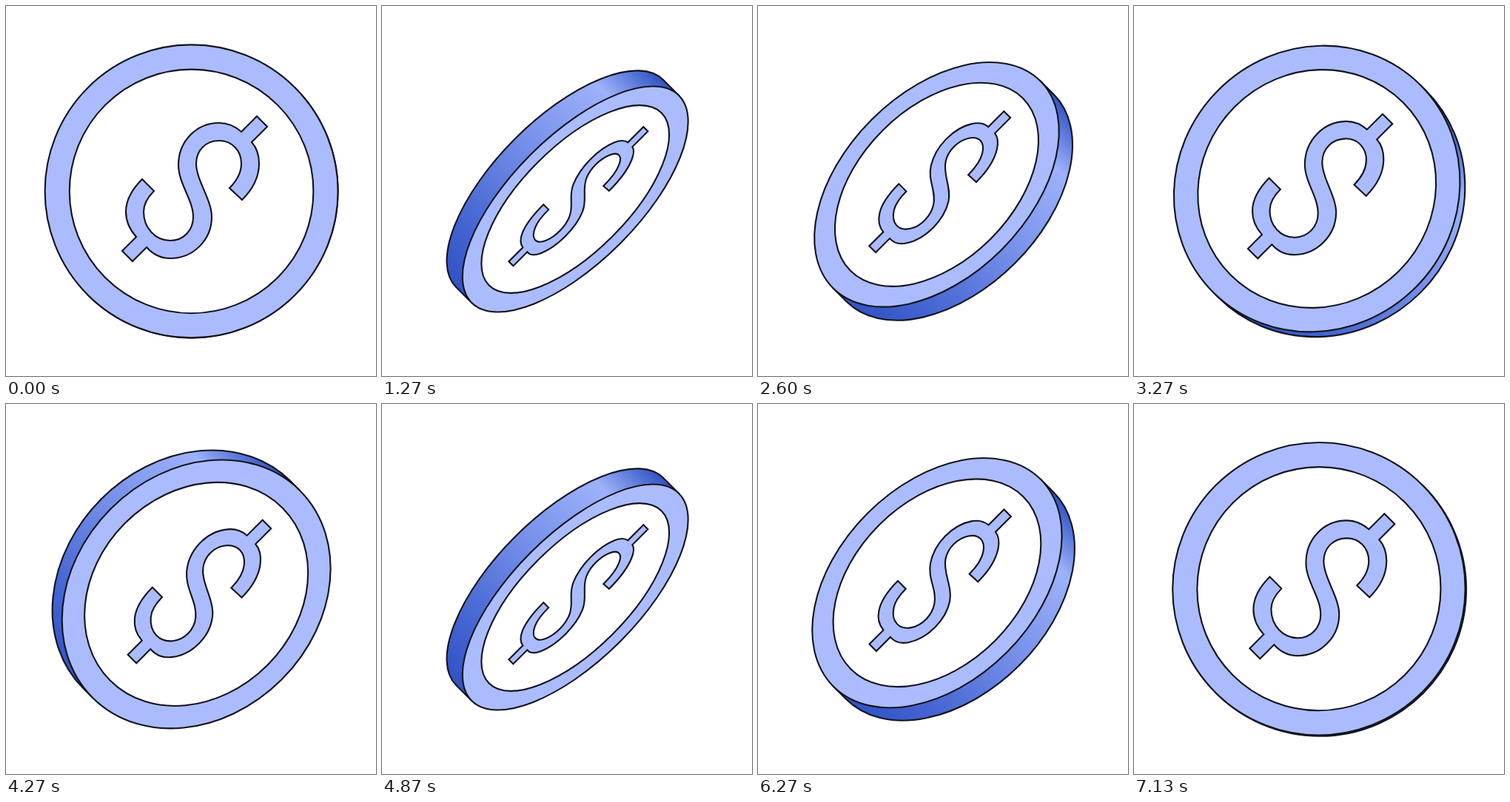
An HTML page for the animation above (7190 ms loop, 500 by 500 pixels).

```html
<!DOCTYPE html>
<html lang="en">
<head>
<meta charset="utf-8">
<title>Spinning coin</title>
<style>
  html, body { margin: 0; width: 100%; height: 100%; overflow: hidden; background: #fff; }
  svg { display: block; width: 100%; height: 100%; }
  path, circle { stroke: #10131c; stroke-width: 2.1; vector-effect: non-scaling-stroke; }
  .blue { fill: #abbcfe; }
  .white { fill: #fff; }
</style>
</head>
<body>
<svg viewBox="0 0 500 500">
  <defs>
    <linearGradient id="shade" gradientUnits="userSpaceOnUse" x1="-140" y1="140" x2="140" y2="-140">
      <stop offset="0" stop-color="#3153c4"/>
      <stop offset=".2" stop-color="#4767d3"/>
      <stop offset=".52" stop-color="#7690ea"/>
      <stop offset=".83" stop-color="#9eb2fb"/>
      <stop offset="1" stop-color="#3052c4"/>
    </linearGradient>
  </defs>
  <g transform="translate(250.6 250.4)">
    <path id="rim" fill="url(#shade)"/>
    <g id="face">
      <circle class="blue" r="198"/>
      <circle class="white" r="164.8"/>
      <path class="blue" transform="translate(-250.6 -250.4)" d="
        M302 246 C312 236 318 225 318 213 C318 195 305 182 288 182 C270 182 257 195 257 213
        C257 235 278 262 278 285 C278 316 253 341 222 341 C209 341 198 335 190 326
        L171 345 L157 331 L176 312
        C167 302 162 291 162 278 C162 261 171 247 184 234
        L200 250 C191 259 186 268 186 278 C186 300 202 317 222 317 C240 317 253 303 253 285
        C253 262 233 240 233 215 C233 183 257 158 288 158 C299 158 309 162 318 170
        L339 149 L353 163 L332 184
        C339 192 342 202 342 213 C342 232 333 248 319 262 Z"/>
    </g>
  </g>
</svg>
<script>
  const LOOP = 7190, STEPS = 108, STEP_MS = 200 / 3;
  const RADIUS = 198, HALF_DEPTH = 16.8;
  const NARROWING = 0.02; // a near viewer sees a turned face slightly slimmer
  const rim = document.getElementById('rim');
  const face = document.getElementById('face');

  // The coin turns about the diagonal that rises to the right.
  function draw(time) {
    const step = Math.floor((time % LOOP + 3.4) / STEP_MS) % STEPS;
    const angle = step / STEPS * 2 * Math.PI;
    const cos = Math.cos(angle), sin = Math.sin(angle);
    const squash = Math.max(Math.abs(cos) - NARROWING * Math.abs(sin), 0.001);
    const shift = Math.sign(cos) * sin * HALF_DEPTH * Math.SQRT1_2;
    const end = RADIUS * Math.SQRT1_2;
    const point = (offset, side) => `${offset + side * end} ${offset - side * end}`;

    rim.setAttribute('d',
      `M${point(shift, 1)} L${point(-shift, 1)} ` +
      `A${RADIUS} ${RADIUS * squash} -45 0 ${shift > 0 ? 0 : 1} ${point(-shift, -1)} ` +
      `L${point(shift, -1)} Z`);

    const a = (1 + squash) / 2, b = (squash - 1) / 2;
    face.setAttribute('transform', `matrix(${a} ${b} ${b} ${a} ${shift} ${shift})`);
  }

  const start = performance.now();
  function tick() {
    draw(performance.now() - start);
    requestAnimationFrame(tick);
  }
  tick();
</script>
</body>
</html>
```
